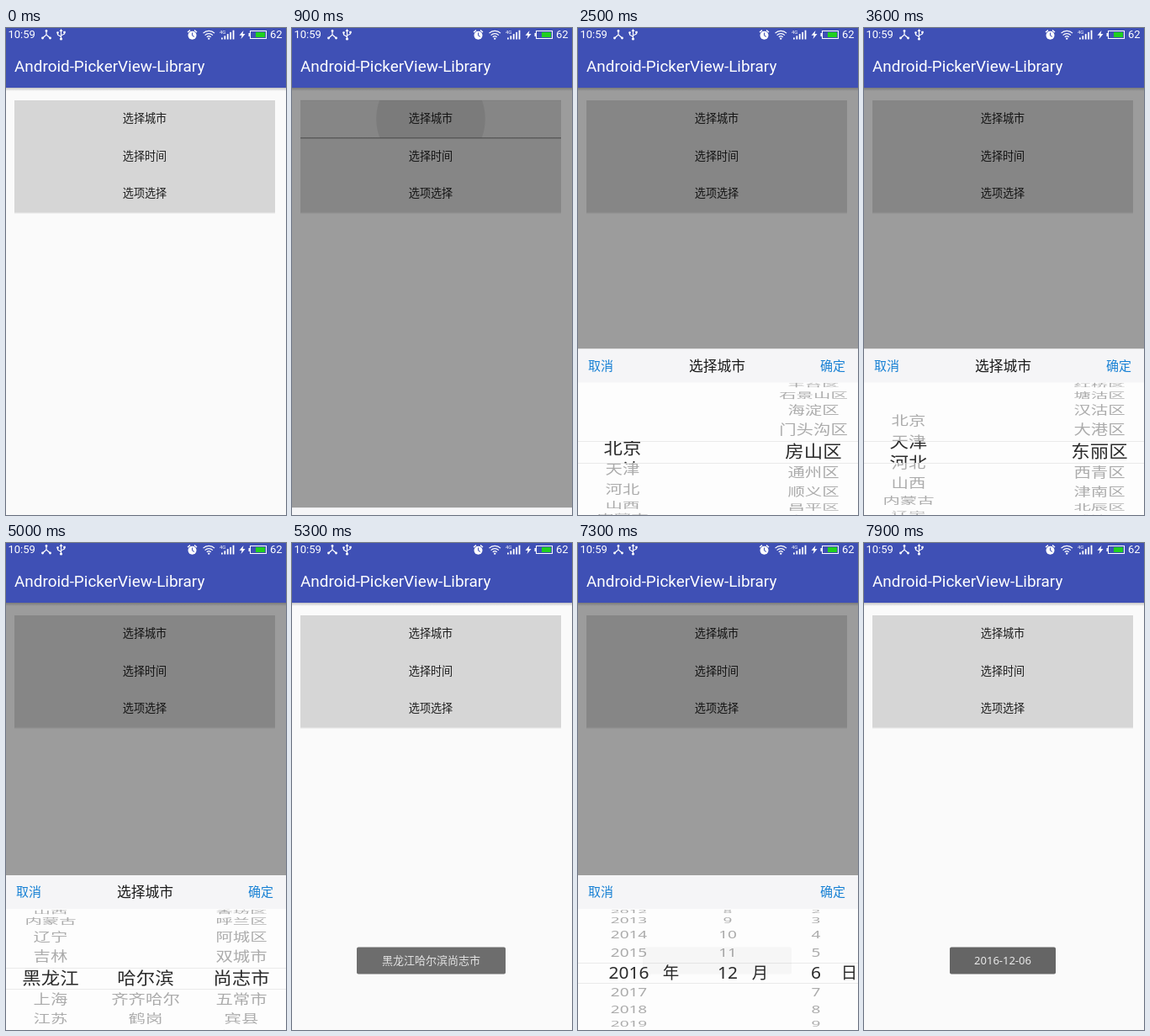
These frames come from a looping animation (333 px wide and 579 px high, 8000 ms). An HTML page with a canvas:

```html
<!DOCTYPE html>
<html lang="zh">
<head>
<meta charset="utf-8">
<title>Picker demo</title>
<style>
html, body { margin: 0; width: 333px; height: 579px; overflow: hidden; background: #fafafa; }
canvas { display: block; }
</style>
</head>
<body>
<canvas id="stage" width="333" height="579"></canvas>
<script>
const W = 333, H = 579, LOOP = 8000;
const ctx = document.getElementById('stage').getContext('2d');
const CJK = '"Noto Sans", "Noto Sans CJK SC", "Noto Sans CJK", sans-serif';
const UI = 'Roboto, sans-serif';
const BLUE = '#3f50b5', LINK = '#1780d4', PRESSED = '#c2daf5';
const SLIDE = 300;

const list = s => s.split(' ');
const provinces = list('北京 天津 河北 山西 内蒙古 辽宁 吉林 黑龙江 上海 江苏 浙江 安徽');
const cities = list('哈尔滨 齐齐哈尔 鹤岗 双鸭山 鸡西');
const beijing = list('东城区 西城区 崇文区 宣武区 朝阳区 丰台区 石景山区 海淀区 门头沟区 房山区 通州区 顺义区 昌平区 大兴区');
const tianjin = list('和平区 河东区 河西区 南开区 河北区 红桥区 塘沽区 汉沽区 大港区 东丽区 西青区 津南区 北辰区 武清区');
const harbin = list('道里区 南岗区 道外区 平房区 松北区 香坊区 呼兰区 阿城区 双城市 尚志市 五常市 宾县 方正县 依兰县');
const range = (a, b) => Array.from({ length: b - a + 1 }, (_, i) => String(a + i));
const years = range(1990, 2030), months = range(1, 12), days = range(1, 31);

// [time, wheel position]
const leftKeys = [[2450, 0], [2500, .15], [2600, .7], [2700, 1], [3570, 1], [3600, 1.45],
  [3700, 2.9], [3800, 4.3], [3900, 5.5], [4000, 6.3], [4100, 6.8], [4200, 7]];
const rightKeys = [[1780, 0], [1800, .23], [1900, 2], [2000, 4], [2100, 5.8],
  [2200, 7.2], [2300, 8.2], [2400, 8.8], [2500, 9]];

const city = { open: 889, close: 4924, top: 381.5, radius: 82.5, x: 165, row: 0, title: '选择城市' };
const time = { open: 6189, close: 7490, top: 395, radius: 76, x: 179, row: 1, title: '' };
const toasts = [
  { text: '黑龙江哈尔滨尚志市', x: 77, w: 177, start: 5024, end: 6830 },
  { text: '2016-12-06', x: 102, w: 126, start: 7590, end: LOOP }
];

const clamp = v => Math.max(0, Math.min(1, v));
const easeOut = u => 1 - (1 - u) ** 2;

function at(keys, t) {
  if (t <= keys[0][0]) return keys[0][1];
  for (let i = 1; i < keys.length; i++) {
    const [a, p] = keys[i - 1], [b, q] = keys[i];
    if (t < b) return p + (q - p) * (t - a) / (b - a);
  }
  return keys[keys.length - 1][1];
}

function rect(x, y, w, h, color) {
  ctx.fillStyle = color;
  ctx.fillRect(x, y, w, h);
}

// Vertically centred on cy, with the baseline on a whole pixel.
function text(s, x, cy, size, color, align = 'center', font = CJK) {
  ctx.font = `${size}px ${font}`;
  ctx.textAlign = align;
  ctx.fillStyle = color;
  ctx.fillText(s, x, Math.round(cy + size * .35));
}

function clipped(x, y, w, h, draw) {
  ctx.save();
  ctx.beginPath();
  ctx.rect(x, y, w, h);
  ctx.clip();
  draw();
  ctx.restore();
}

function stroke(d, width = 1.2, color = '#fff') {
  ctx.lineWidth = width;
  ctx.strokeStyle = color;
  ctx.stroke(new Path2D(d));
}

function dot(x, y, r, color = '#fff') {
  ctx.fillStyle = color;
  ctx.beginPath();
  ctx.arc(x, y, r, 0, 7);
  ctx.fill();
}

function shade(y, h, alpha) {
  const g = ctx.createLinearGradient(0, y, 0, y + h);
  g.addColorStop(0, `rgba(0,0,0,${alpha})`);
  g.addColorStop(1, 'rgba(0,0,0,0)');
  return g;
}

function statusBar() {
  text('10:59', 2.5, 7.5, 13, '#fff', 'left', UI);
  stroke('M48 3V8L43.5 12M48 8L52.5 12');
  dot(48, 3.4, 1.4); dot(43.5, 12, 1.4); dot(52.5, 12, 1.4);
  stroke('M65.5 3V13M65.5 10.5L61.5 8V5.5M65.5 9L69.5 7V4.5');
  dot(65.5, 13, 1.6); dot(61.5, 5.5, 1.3); rect(68.3, 3.8, 2.4, 2.4, '#fff');
  ctx.fill(new Path2D('M63.5 4L65.5 1L67.5 4Z'));

  dot(221.5, 8.7, 5);
  stroke('M216 5L219 2.6M227 5L224 2.6', 1.4);
  stroke('M221.5 5.5V9L224 10.4', 1, BLUE);
  stroke('M234.5 6.2A9.5 9.5 0 0 1 248 6.2M236.6 8.6A6.5 6.5 0 0 1 245.9 8.6M238.8 10.8A3.6 3.6 0 0 1 243.7 10.8', 1.2);
  dot(241.2, 12.6, 1.2);
  text('4G', 254, 4.5, 6, '#fff', 'left', UI);
  for (let i = 0; i < 5; i++) rect(256 + i * 3.4, 11.5 - i * 2.2, 1.8, 2 + i * 2.2, '#fff');
  ctx.fill(new Path2D('M282.5 3L277.5 8.8H280.6L279.5 13L284.5 7H281.5Z'));
  ctx.lineWidth = 1;
  ctx.strokeStyle = '#fff';
  ctx.strokeRect(290.5, 3.5, 19, 9);
  rect(288.5, 6, 1.5, 4, '#fff');
  rect(297, 5, 11, 6, '#20d020');
  text('62', 314, 7.5, 13, '#fff', 'left', UI);
}

function ripple(p, t) {
  const dt = t - p.open + 100;
  if (dt < 0 || dt > 400) return;
  const fade = clamp(1 - (dt - 110) / 290), y = 86 + p.row * 44.5;
  clipped(10, y, 310, 44.5, () => dot(p.x, y + 22, 20 + dt * .4, `rgba(0,0,0,${.08 * fade})`));
  rect(10, y - .5, 310, 1, `rgba(0,0,0,${.07 * fade})`);
  rect(10, y + 44, 310, 2, shade(y + 44, 2.5, .4 * fade));
}

function page(t) {
  rect(0, 0, W, H, '#fafafa');
  rect(0, 71, W, 4, shade(71, 4, .22));
  rect(0, 0, W, 71, BLUE);
  statusBar();
  text('Android-PickerView-Library', 10, 45.5, 18.9, '#fff', 'left', UI);
  rect(10, 219.5, 310, 1.5, shade(219.5, 1.5, .12));
  rect(10, 86, 310, 133.5, '#d6d6d6');
  ripple(city, t);
  ripple(time, t);
  ['选择城市', '选择时间', '选项选择'].forEach((s, i) => text(s, 165, 107.8 + i * 44.3, 13.1, '#1e1e1e'));
}

// Cylinder wheel: dark wide text inside the centre band, grey flattened text outside it.
function wheel(items, pos, x, cy, R, size) {
  const half = R * Math.PI / 20;
  const pass = (color, sx, sy, dy) => items.forEach((s, i) => {
    const a = (i - pos) * Math.PI / 10;
    if (Math.abs(a) >= Math.PI / 2) return;
    ctx.save();
    ctx.translate(x, cy + R * Math.sin(a) + dy);
    ctx.scale(sx, sy * Math.cos(a));
    text(s, 0, 0, size, color);
    ctx.restore();
  });
  const outer = () => pass('#ababab', 1, .8, -.8);
  clipped(0, cy - R, W, R - half, outer);
  clipped(0, cy + half, W, R - half, outer);
  clipped(0, cy - half, W, 2 * half, () => pass('#2a2a2a', 1.1, 1, 0));
}

function cityWheels(t, cy, R) {
  const area = t < 2850 ? beijing : t < 4450 ? tianjin : harbin;
  wheel(provinces, at(leftKeys, t), 53, cy, R, 20.4);
  if (area === harbin) wheel(cities, 0, 166, cy, R, 20.4);
  wheel(area, at(rightKeys, t), 280, cy, R, 20.4);
}

function timeWheels(cy, R) {
  wheel(years, 26, 60.5, cy, R, 19);
  wheel(months, 11, 178, cy, R, 19);
  wheel(days, 5, 283, cy, R, 19);
  ['年', '月', '日'].forEach((s, i) => text(s, 110.5 + i * 106, cy, 19.5, '#2a2a2a'));
}

function panel(p, t) {
  if (t < p.open || t >= p.close + SLIDE) return;
  const R = p.radius, height = 40 + 2 * R;
  const inn = 1 - easeOut(clamp((t - p.open) / SLIDE));
  const out = clamp((t - p.close) / SLIDE) ** 2;
  const top = p.top + height * (inn + out), cy = top + 40 + R, half = R * Math.PI / 20;
  rect(0, 71, W, H - 71, 'rgba(0,0,0,.376)');
  rect(0, top, W, height, '#fdfdfd');
  rect(0, top, W, 40, '#f5f5f7');
  const held = t > p.close - 100 && t < p.close;
  text('取消', 12, top + 20, 15, LINK, 'left');
  text('确定', 318, top + 20, 15, held ? PRESSED : LINK, 'right');
  text(p.title, 165.5, top + 20.5, 16.8, '#1a1a1a');
  rect(0, Math.round(cy - half), W, 1, '#eaeaea');
  rect(0, Math.round(cy + half), W, 1, '#eaeaea');
  if (p === city) cityWheels(t, cy, R);
  else timeWheels(cy, R);
}

function toast(o, t) {
  const alpha = easeOut(clamp((t - o.start) / 430)) * (1 - clamp((t - o.end) / 480) ** 2);
  if (alpha <= 0) return;
  ctx.save();
  ctx.globalAlpha = alpha;
  ctx.fillStyle = 'rgba(50,50,50,.8)';
  ctx.beginPath();
  ctx.roundRect(o.x, 480.5, o.w, 32, 2);
  ctx.fill();
  text(o.text, o.x + o.w / 2, 496.5, 13, '#f4f4f4');
  ctx.restore();
}

function draw() {
  const t = performance.now() % LOOP;
  page(t);
  panel(city, t);
  panel(time, t);
  toasts.forEach(o => toast(o, t));
  requestAnimationFrame(draw);
}
draw();
</script>
</body>
</html>
```
